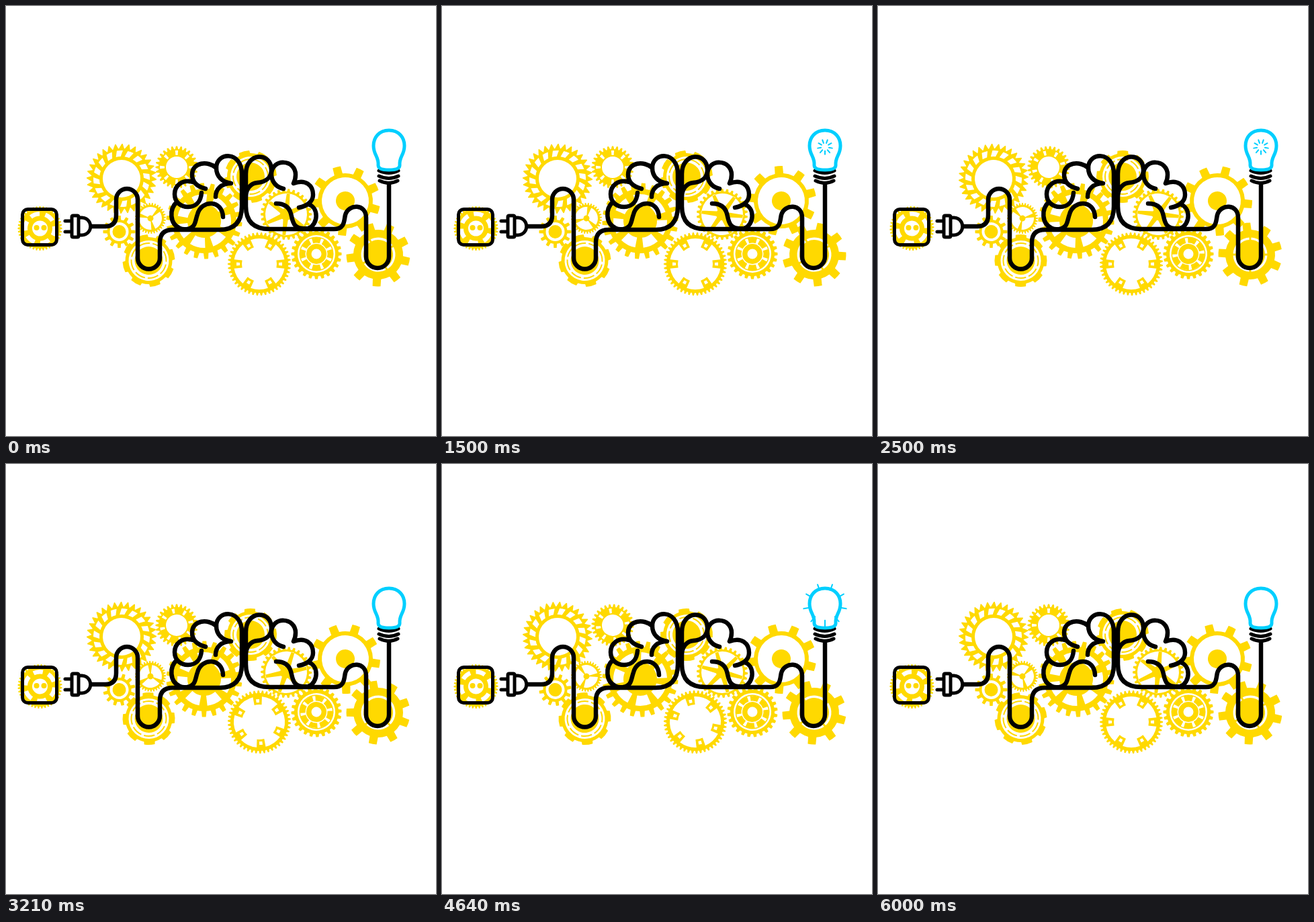
An HTML page with a canvas for the animation above (6.07 s loop, 640 by 640 pixels).

```html
<!DOCTYPE html>
<html>
<head>
<meta charset="utf-8">
<style>
html, body { margin: 0; width: 100%; height: 100%; overflow: hidden; background: #fff; }
canvas { display: block; }
</style>
</head>
<body>
<canvas id="stage" width="640" height="640"></canvas>
<script>
const ctx = document.getElementById('stage').getContext('2d');
const LOOP = 6070, STEPS = 85, TAU = Math.PI * 2, DEG = TAU / 360;
const YELLOW = '#ffd900', CYAN = '#00cfff';

// Gear outline; tip and base are tooth widths as shares of the pitch
const teeth = (n, r0, r1, tip, base, skew = 0) => path => {
  const s = TAU / n;
  const shape = new Path2D();
  for (let i = 0; i < n; i++) {
    const a = i * s;
    shape.arc(0, 0, r1, a + (skew - tip / 2) * s, a + (skew + tip / 2) * s);
    shape.arc(0, 0, r0, a + base / 2 * s, a + (1 - base / 2) * s);
  }
  shape.closePath();
  path.addPath(shape);
};
const disc = r => path => {
  path.moveTo(r, 0);
  path.arc(0, 0, r, 0, TAU);
};
// Ring of n separate arc-shaped pieces
const slots = (n, r0, r1, width, offset = 0, skew = 0) => path => {
  const s = TAU / n, half = s * width / 2;
  for (let i = 0; i < n; i++) {
    const a = i * s + offset * DEG, b = a + skew * DEG;
    path.moveTo(r1 * Math.cos(b - half), r1 * Math.sin(b - half));
    path.arc(0, 0, r1, b - half, b + half);
    path.arc(0, 0, r0, a + half, a - half, true);
    path.closePath();
  }
};
const gear = (x, y, turns, phase, ...parts) => {
  const path = new Path2D();
  parts.forEach(part => part(path));
  return { x, y, turns, phase, path };
};
const drum = [teeth(8, 35, 39, .52, .6), disc(30), slots(8, 25, 27, .8), disc(21)];

const gears = [
  gear(172, 257, -1, 0, teeth(32, 45, 52, .12, .9, .1), slots(16, 33, 42, .55, 14, 5), disc(28)),
  gear(254, 240, -1, -90, teeth(28, 27, 31.5, .3, .75), slots(8, 18, 25, .22), disc(16)),
  gear(295, 320, -1, 5, teeth(22, 48, 56.5, .36, .55), slots(7, 25, 40, .66, -3)),
  gear(364, 254, 1, -14.5, ...drum),
  gear(212.5, 379, 1, -14.5, ...drum),
  gear(417, 310, 1, 36, teeth(30, 34, 38, .35, .65), disc(31), teeth(6, 9, 31.5, .14, .8)),
  gear(505, 290, 1, 15.5, teeth(9, 41, 52, .33, .44), disc(35), disc(14)),
  gear(554, 370, -1, 13, teeth(9, 37, 47.5, .36, .48), slots(4, 22, 25.5, .92, 2)),
  gear(377, 384, 2, 0, teeth(46, 43, 47, .3, .7), teeth(6, 38, 26, .4, .34), slots(6, 29, 34, .14)),
  gear(462, 369, 1, 0, teeth(24, 33, 37.5, .4, .65), disc(28), disc(25.5), disc(24), slots(8, 16.5, 24, .75), disc(15), disc(7.5)),
  gear(168.5, 336, -1, 0, teeth(12, 18, 24, .35, .55), disc(14), disc(10)),
  gear(215, 316, 1, 75, teeth(32, 20, 23, .35, .7), slots(3, 4.5, 17, .83, 60)),
  gear(50.5, 331, 1, 0, teeth(40, 30, 33, .35, .7), slots(6, 18.5, 25, .62, 10), disc(11.5))
];

const wires = new Path2D(`
  M127 328 H148 Q164 328 164 311 V288 A16 16 0 0 1 196 288 V375 A16.5 16.5 0 0 0 229 375
  V352 Q229 333 248 333 H318 Q351 333 351 298
  V250 C351 215 313 217 313 241 C313 254 322 262 335 264 C320 264 312 273 312 284
  M313 241 C301 230 277 232 277 251 C277 263 285 269 297 272
  M278 262 C262 257 251 268 251 280 C251 292 260 299 271 299 C283 299 290 291 291 278
  M254 292 C243 302 243 324 259 331 Q263 333 270 332 C283 329 281 321 285 310
  C291 288 322 288 323 314
  M357 284 C357 272 364 264 374 263 C386 262 395 256 395 244 C395 217 357 217 357 250
  V298 Q357 332 392 332 H488 C505 332 503 318 505 311 C510 294 536 294 536 315
  V373 A17 17 0 0 0 570 373 V264
  M413 272 C403 270 395 262 395 250 C396 226 431 228 431 251 Q431 258 428 264
  C446 257 457 267 457 281 C457 292 447 298 436 300
  M450 295 C466 300 465 325 450 331 C425 334 427 318 424 309 C421 298 412 294 402 294`);
const plug = new Path2D(`
  M88 320 H98 M88 336 H98 M100 312 H106 Q108 312 108 314 V342 Q108 344 106 344
  H100 Q98 344 98 342 V314 Q98 312 100 312 Z
  M108 315 H113 C130 316 130 340 113 341 H108`);
const base = new Path2D('M555 245 Q570 252 584 245 M555 253 Q570 260 584 253 M556 260 Q570 267 583 260');
const bulb = new Path2D(`M570 185 C555 185 547 196 547 208 C547 222 555 224 554 237
  Q554 244 570 244 Q586 244 586 237 C585 224 593 222 593 208 C593 196 585 185 570 185 Z`);
const socket = new Path2D();
socket.roundRect(24.5, 302.5, 51, 53, 8);

function stroke(path, color, width) {
  ctx.strokeStyle = color;
  ctx.lineWidth = width;
  ctx.stroke(path);
}

function drawGear({ x, y, turns, phase, path }, step) {
  ctx.save();
  ctx.translate(x, y);
  ctx.rotate((phase + turns * step * 360 / 84) * DEG);
  ctx.fill(path, 'evenodd');
  ctx.restore();
}

// Nine rays shoot out of the bulb, five times per loop
function drawRays(step) {
  const k = (step - 7) % 14;
  if (step < 7 || step >= 77 || k > 9) return;
  const u = k / 9;
  const outer = 11 + 40 * (1 - (1 - u) ** 3);
  const inner = 6 + 43 * (1 - (1 - u) ** 2);
  const rays = new Path2D();
  for (let i = 0; i < 9; i++) {
    const a = (20 + i * 40) * DEG, c = -Math.cos(a), s = Math.sin(a);
    rays.moveTo(570 + inner * s, 209.7 + inner * c);
    rays.lineTo(570 + outer * s, 209.7 + outer * c);
  }
  ctx.globalAlpha = 1 - .85 * u ** 4;
  stroke(rays, CYAN, 2);
  ctx.globalAlpha = 1;
}

function draw(now) {
  const step = Math.floor((now % LOOP + 4) / LOOP * STEPS) % STEPS;
  ctx.fillStyle = '#fff';
  ctx.fillRect(0, 0, 640, 640);
  ctx.lineCap = ctx.lineJoin = 'round';

  ctx.fillStyle = YELLOW;
  gears.forEach(g => drawGear(g, step));
  for (const x of [45.5, 56.5]) {
    ctx.beginPath();
    ctx.arc(x, 330, 4, 0, TAU);
    ctx.fill();
  }

  drawRays(step);
  stroke(wires, '#000', 6.5);
  stroke(plug, '#000', 5);
  stroke(base, '#000', 5);
  stroke(socket, '#000', 5);
  stroke(bulb, CYAN, 5);
}

const start = performance.now();
function tick() {
  draw(performance.now() - start);
  requestAnimationFrame(tick);
}
tick();
</script>
</body>
</html>
```
